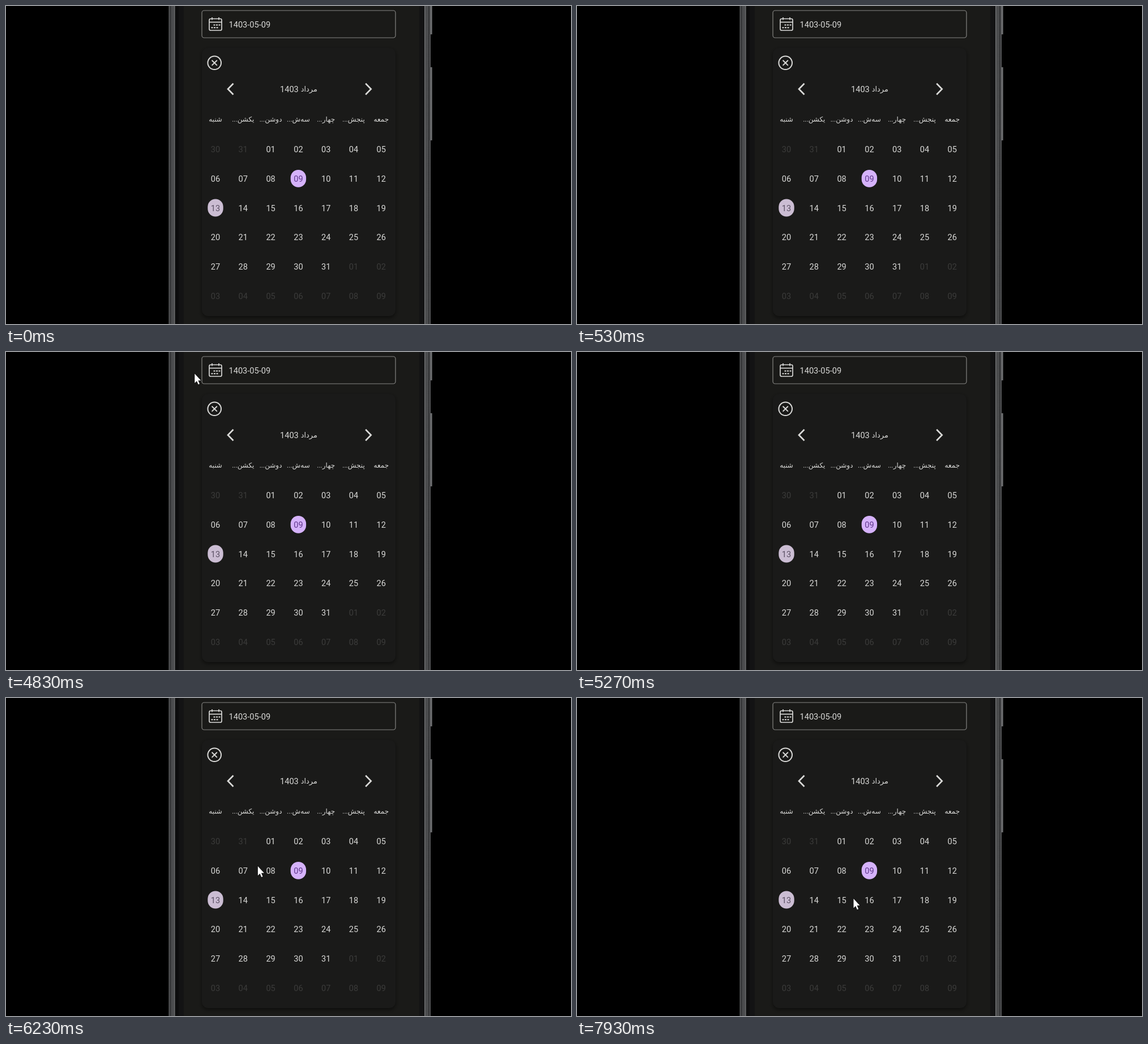
An HTML page with a canvas for the animation above (8 s loop, 998 by 561 pixels).

```html
<!DOCTYPE html>
<html lang="fa">
<head>
<meta charset="utf-8">
<title>Calendar</title>
<style>
html, body { margin: 0; width: 100%; height: 100%; overflow: hidden; background: #000; }
canvas { display: block; }
</style>
</head>
<body>
<canvas id="stage" width="998" height="561"></canvas>
<script>
const ctx = document.getElementById('stage').getContext('2d');
const W = 998, H = 561, LOOP = 8000, FPS = 30;
const LIGHT = '#d9d9d7', DIM = '#3b3b3a';
const FONT = "Roboto, 'DejaVu Sans', sans-serif";
const WEEK = ['شنبه', 'یکشن...', 'دوشن...', 'سه\u200cش...', 'چهار...', 'پنجش...', 'جمعه'];
const ARROW = new Path2D('M0 0V16.5L3.7 13L6.3 19.2L8.7 18.2L6.1 12H11Z');

// Each tour shows the pointer for a while; each leg is an eased curve.
const TOURS = [
  { show: 3830, hide: 5270, at: [570, 151], legs: [
    { start: 4200, end: 4430, via: [920, 30], to: [353, 39] },
    { start: 4800, end: 4870, to: [330, 38] }
  ] },
  { show: 5870, hide: LOOP, at: [317.5, 194], legs: [
    { start: 6200, end: 6400, via: [493, 382], to: [553, 257] },
    { start: 6840, end: 6930, to: [489, 320] },
    { start: 7340, end: 7400, to: [479, 230] },
    { start: 7900, end: 7930, to: [488.5, 354] }
  ] }
];

const easeOut = u => 1 - (1 - u) ** 3;
const clamp = u => Math.min(1, Math.max(0, u));
const colX = c => 370 + c * 48.8;
const rowY = r => 253 + r * 51.7;

function strip(x, w, color, y = 0, h = H) {
  ctx.fillStyle = color;
  ctx.fillRect(x, y, w, h);
}

function box(x, y, w, h, r) {
  ctx.beginPath();
  ctx.roundRect(x, y, w, h, r);
}

function stroke(width, color = LIGHT) {
  ctx.strokeStyle = color;
  ctx.lineWidth = width;
  ctx.stroke();
}

function line(width, ...points) {
  ctx.beginPath();
  points.forEach(p => ctx.lineTo(...p));
  stroke(width);
}

function text(str, x, y, { color = LIGHT, size = 14.6, align = 'center', dir = 'ltr' } = {}) {
  ctx.font = `${size}px ${FONT}`;
  ctx.textAlign = align;
  ctx.direction = dir;
  ctx.fillStyle = color;
  ctx.fillText(str, x, y);
}

// Metal edge, drawn from the outside inwards.
function rail(outer, dir) {
  const band = ctx.createLinearGradient(outer, 0, outer + 11 * dir, 0);
  ['#68696b', '#2e2f31', '#505153', '#454648', '#77787a']
    .forEach((color, i) => band.addColorStop(i / 4, color));
  strip(Math.min(outer, outer + 11 * dir), 11, band);
}

function phone() {
  strip(0, W, '#000');
  strip(288, 462, '#0d0d0e');
  strip(305, 433, '#131314');
  strip(314, 416, '#1a1a18');
  rail(287.5, 1);
  rail(750, -1);
  strip(750, 2.7, '#6c6d6f', 0, 50);
  strip(750, 2.7, '#6c6d6f', 108, 129);
}

function dateIcon(x, y) {
  box(x, y, 22, 20.5, 2.5);
  stroke(1.7);
  line(1.7, [x, y + 6], [x + 22, y + 6]);
  for (const dx of [5, 17]) line(1.7, [x + dx, y - 2.5], [x + dx, y + 2]);
  for (let i = 0; i < 6; i++) {
    const row = Math.floor(i / 3);
    strip(x + 7.5 + (i % 3) * 4.5 - row * 4, 3, LIGHT, y + 10 + row * 4.7, 2);
  }
}

function field() {
  box(346, 8, 342, 48, 4);
  stroke(1.2, '#858583');
  dateIcon(359, 22.5);
  text('1403-05-09', 393.5, 38, { align: 'left' });
}

function closeIcon(x, y) {
  ctx.beginPath();
  ctx.arc(x, y, 11.8, 0, Math.PI * 2);
  stroke(2);
  for (const s of [-1, 1]) line(2, [x - 4.6, y - 4.6 * s], [x + 4.6, y + 4.6 * s]);
}

function chevron(x, dir) {
  line(2.7, [x - 9.5 * dir, 136.7], [x, 146.5], [x - 9.5 * dir, 156.3]);
}

function card() {
  ctx.save();
  ctx.shadowColor = 'rgba(0,0,0,.5)';
  ctx.shadowBlur = 7;
  ctx.shadowOffsetY = 3;
  ctx.fillStyle = '#1a1a19';
  box(346, 74, 342, 473, 11);
  ctx.fill();
  ctx.restore();

  closeIcon(368.2, 100.3);
  chevron(392, -1);
  chevron(644.7, 1);
  text('1403', 484, 152, { align: 'left' });
  text('مرداد', 550, 150.5, { size: 13, align: 'right', dir: 'rtl' });
  WEEK.forEach((name, c) => text(name, colX(c), 204, { size: 12, dir: 'rtl' }));
}

function badge(x, y, color) {
  ctx.fillStyle = color;
  box(x - 13.7, y - 15.4, 27.4, 30.8, 13.7);
  ctx.fill();
}

function days() {
  for (let i = 0; i < 42; i++) {
    const x = colX(i % 7), y = rowY(Math.floor(i / 7));
    const day = (i + 29) % 31 + 1;
    const inside = i > 1 && i < 33;
    let color = inside ? LIGHT : DIM;
    if (inside && day === 9) {
      badge(x, y - 0.4, '#d5b2fa');
      color = '#60388c';
    } else if (inside && day === 13) {
      badge(x, y - 0.4, '#cbbdd3');
      color = '#5b5064';
    }
    text(String(day).padStart(2, '0'), x, y + 5.3, { color });
  }
}

function place(tour, t) {
  let from = tour.at;
  for (const { start, end, to, via } of tour.legs) {
    if (t < start) break;
    const u = easeOut(clamp((t - start) / (end - start)));
    const a = from;
    from = to.map((b, i) => {
      const mid = via ? via[i] : (a[i] + b) / 2;
      return (1 - u) ** 2 * a[i] + 2 * u * (1 - u) * mid + u * u * b;
    });
  }
  return from;
}

function pointer(t) {
  const tour = TOURS.find(({ show, hide }) => t >= show && t < hide);
  if (!tour) return;
  // The pointer moves in whole video ticks.
  const tick = Math.floor((t + 4) * FPS / 1000) * 1000 / FPS;
  ctx.save();
  ctx.translate(...place(tour, tick));
  ctx.strokeStyle = '#0a0a0a';
  ctx.lineWidth = 1.2;
  ctx.stroke(ARROW);
  ctx.fillStyle = '#fff';
  ctx.fill(ARROW);
  ctx.restore();
}

function draw() {
  phone();
  field();
  card();
  days();
  pointer((performance.now() - start) % LOOP);
  requestAnimationFrame(draw);
}

const start = performance.now();
draw();
</script>
</body>
</html>
```
